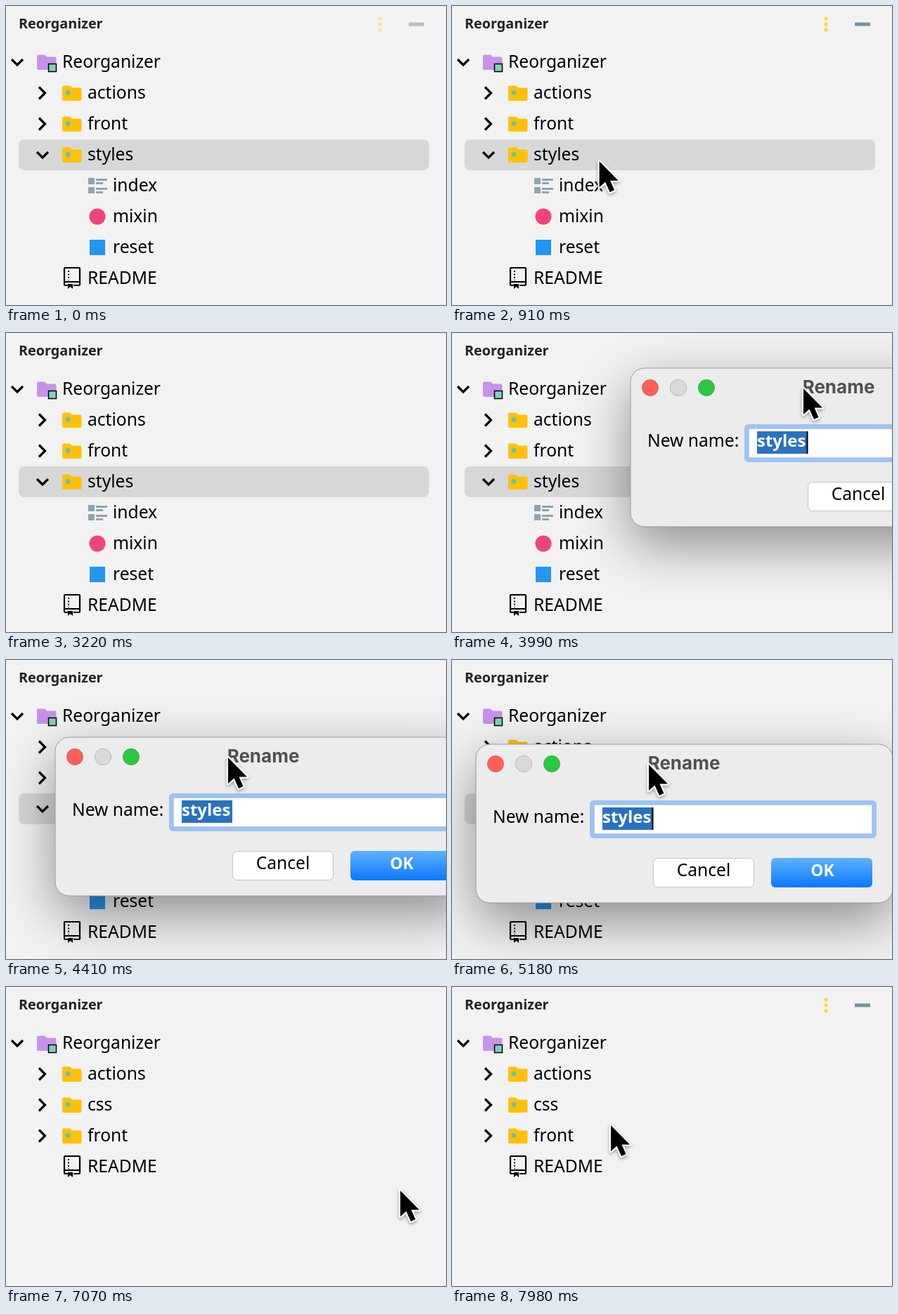
An HTML page that plays this animation: 626x426 px, repeating every 8 s.

```html
<!DOCTYPE html>
<html lang="en">
<head>
<meta charset="utf-8">
<title>Renaming a group</title>
<style>
  html, body { margin: 0; width: 100%; height: 100%; overflow: hidden; background: #f2f2f2; }
  svg { display: block; width: 626px; height: 426px; }
  text { font: 500 24.6px "Noto Sans", "Open Sans", sans-serif; fill: #000; white-space: pre; }
  .head { font-size: 19.8px; font-weight: 700; fill: #222; }
  .title { font: 700 26px Inter, "Liberation Sans", sans-serif; fill: #505050; text-anchor: middle; }
  .mid { text-anchor: middle; }
  .menu text { font-size: 24px; }
  .white { fill: #fff; }
  .ok { fill: #fff; font-size: 23px; font-weight: 600; }
  .selected { fill: #fff; font-size: 24px; font-weight: 600; }
  .chev { fill: none; stroke: #000; stroke-width: 3.2; }
  #dialogBox { filter: drop-shadow(0 26px 38px rgba(0, 0, 0, .42)); }
  #menuShadow { filter: drop-shadow(0 10px 12px rgba(0, 0, 0, .38)); }
  #cursor path { filter: drop-shadow(0 2px 2px rgba(0, 0, 0, .35)); }
</style>
</head>
<body>
<svg viewBox="0 0 626 426">
  <defs>
    <linearGradient id="blue" x2="0" y2="1">
      <stop offset="0" stop-color="#5fb1fb"/><stop offset="1" stop-color="#0a78ff"/>
    </linearGradient>
    <path id="down" class="chev" d="M-8-4L0 4 8-4"/>
    <path id="right" class="chev" d="M-5-8.500L3.500 0-5 8.500"/>
    <path id="folder" d="M-12-10.500h9l3 3h11.500a2 2 0 0 1 2 2v14.500a2 2 0 0 1-2 2h-23.500a2 2 0 0 1-2-2v-17.500a2 2 0 0 1 2-2z"/>
    <g id="root">
      <use href="#folder" fill="#c792ea"/>
      <rect x="2.500" y="2.500" width="11" height="11" fill="#7fd0bd" stroke="#000" stroke-width="1.500"/>
    </g>
    <g id="group">
      <use href="#folder" fill="#ffc107"/>
      <circle cx="-6" cy="-.5" r="3.500" fill="#66c2ae"/>
    </g>
    <path id="list" fill="#90a4ae" d="M-13-11h9v9h-9zM-13 2h9v9h-9zM-2-10h16v3h-16zM-2-5h10v3h-10zM-2 3h16v3h-16zM-2 8h10v3h-10z"/>
    <circle id="pink" r="11.500" fill="#f0437a"/>
    <rect id="square" x="-11" y="-11" width="22" height="22" fill="#2196f3"/>
    <g id="book" fill="none" stroke="#000" stroke-width="2.200">
      <path d="M-6 10h-4a1 1 0 0 1-1-1v-23a1 1 0 0 1 1-1h20a1 1 0 0 1 1 1v23a1 1 0 0 1-1 1h-8M-11 5h22"/>
      <path d="M-5-11v14" stroke-dasharray="2 2.400" stroke-width="2"/>
      <path d="M-6 8h7v7l-3.500-3-3.500 3z" fill="#000" stroke="none"/>
    </g>
  </defs>

  <rect width="626" height="426" fill="#f2f2f2"/>
  <text class="head" x="18" y="32">Reorganizer</text>
  <g id="tools">
    <g fill="#ffd740">
      <circle cx="532" cy="18" r="2.700"/><circle cx="532" cy="26" r="2.700"/><circle cx="532" cy="34" r="2.700"/>
    </g>
    <rect x="573" y="23.500" width="22" height="5" fill="#78909c"/>
  </g>
  <g id="before"><rect x="18" y="190" width="584" height="44" rx="8" fill="#d7d7d7"/></g>
  <g id="after"></g>

  <g id="menu" class="menu">
    <rect id="menuShadow" x="207.500" y="203.500" width="203" height="187" rx="16" fill="#f0f0f0"/>
    <rect x="207.500" y="203.500" width="203" height="187" rx="16" fill="#f0f0f0" stroke="#5a5a5a"/>
    <rect id="hover" x="218" width="182" height="44" rx="8" fill="#2a74c2"/>
    <text id="add" x="238" y="246">Add Group</text>
    <text id="rename" x="238" y="294">Rename</text>
    <path d="M231 321h157" stroke="#d8d8d8" stroke-width="2"/>
    <text x="238" y="360">Unshelve</text>
  </g>

  <g id="dialog">
    <rect id="dialogBox" width="593" height="226" rx="20" fill="#ececec"/>
    <rect width="593" height="226" rx="20" fill="#ececec" stroke="#9a9a9a"/>
    <g stroke-opacity=".18" stroke="#000">
      <circle cx="28" cy="28" r="11.700" fill="#ff5f57"/>
      <circle cx="68" cy="28" r="11.700" fill="#d9d9d9"/>
      <circle cx="108" cy="28" r="11.700" fill="#28c840"/>
    </g>
    <text class="title" x="296" y="36">Rename</text>
    <text x="24" y="112">New name:</text>
    <rect x="162" y="80" width="408" height="54" rx="6" fill="#9bc3f5"/>
    <rect x="168.500" y="86.500" width="395" height="41" fill="#fff" stroke="#c4cad2"/>
    <rect id="mark" x="180" y="90" width="72" height="32" fill="#2a72c0"/>
    <text id="field" x="180" y="112"></text>
    <rect id="caret" y="90" width="2" height="32"/>
    <rect x="252.500" y="162.500" width="143" height="41" rx="6" fill="#fff" stroke="#c2c2c2"/>
    <text class="mid" x="324" y="188">Cancel</text>
    <rect x="420" y="162" width="144" height="42" rx="6" fill="url(#blue)"/>
    <rect id="press" x="420" y="162" width="144" height="42" rx="6" fill="#003a9a" opacity=".3"/>
    <text class="mid ok" x="493" y="188">OK</text>
  </g>

  <g id="cursor">
    <path d="M1 2V39L9.500 31.500 16 46 22.500 43 16.500 29.500H28Z" stroke="#fff" stroke-width="4.500" stroke-linejoin="round" paint-order="stroke"/>
  </g>
</svg>
<script>
const LOOP = 8000, STEP = 70, FIRST_ROW = 80, ROW = 44, INDENT = 36;
const el = Object.fromEntries([...document.querySelectorAll('[id]')].map(e => [e.id, e]));

// Tree rows: depth, arrow, icon, label
const head = [[0, 'down', 'root', 'Reorganizer'], [1, 'right', 'group', 'actions']];
const readme = [1, '', 'book', 'README'];
const rowsBefore = [
  ...head,
  [1, 'right', 'group', 'front'],
  [1, 'down', 'group', 'styles'],
  [2, '', 'list', 'index'],
  [2, '', 'pink', 'mixin'],
  [2, '', 'square', 'reset'],
  readme
];
const rowsAfter = [...head, [1, 'right', 'group', 'css'], [1, 'right', 'group', 'front'], readme];

const use = (id, x, y) => id ? `<use href="#${id}" x="${x}" y="${y}"/>` : '';
const drawRow = ([depth, arrow, icon, label], i) => {
  const x = depth * INDENT, y = FIRST_ROW + i * ROW;
  return use(arrow, x + 16, y) + use(icon, x + 58, y) +
    `<text x="${x + 80}" y="${y + 8}">${label}</text>`;
};
el.before.innerHTML += rowsBefore.map(drawRow).join('');
el.after.innerHTML = rowsAfter.map(drawRow).join('');

const linear = p => p;
const smooth = p => p * p * (3 - 2 * p);

// Keys are [time, ...values]; values hold before the first and after the last.
function track(keys, t, ease = linear) {
  const i = keys.findIndex(k => k[0] > t);
  if (i === 0) return keys[0].slice(1);
  if (i < 0) return keys.at(-1).slice(1);
  const a = keys[i - 1], b = keys[i];
  const p = ease((t - a[0]) / (b[0] - a[0]));
  return a.slice(1).map((v, n) => v + (b[n + 1] - v) * p);
}

const toolsFade = [[0, .5], [280, 1], [1820, 1], [2240, 0], [7070, 0], [7490, 1]];
const shadowFade = [[1120, .25], [1330, .6], [1400, .6], [1610, 1]];
const menuFade = [[2310, 1], [2660, 0]];
const drag = [[3640, 570, -44], [3710, 500, -24], [3990, 254, 50], [4200, 152, 88], [4410, 70, 110], [4620, 34, 120]];
const approach = [[350, 226, 426], [980, 208, 212], [1820, 208, 212], [2240, 268, 284]];
const leave = [[6230, 281, 147], [6510, 538, 249], [6720, 560, 288], [7630, 560, 288], [7980, 225, 195]];
const typed = [[0, 'styles'], [5810, 'c'], [6020, 'cs'], [6230, 'css']];

const show = (e, on) => e.setAttribute('visibility', on ? 'visible' : 'hidden');
const move = (e, [x, y]) => e.setAttribute('transform', `translate(${x} ${y})`);
const within = (t, a, b) => t >= a && t < b;
const display = (e, on) => { e.style.display = on ? '' : 'none'; };

function cursorAt(t, box) {
  if (within(t, 420, 3150)) return track(approach, t, smooth);
  if (within(t, 3710, 5810)) return [box[0] + 245, box[1] + 27];
  if (t >= 6230) return track(leave, t, t > 7500 ? smooth : linear);
  return null;
}

function drawMenu(t, pos) {
  display(el.menu, within(t, 1120, 2660));
  el.menu.style.opacity = track(menuFade, t)[0];
  el.menuShadow.style.opacity = track(shadowFade, t)[0];
  const y = pos ? pos[1] : 0;
  const onAdd = t >= 1890 && within(y, 218, 262), onRename = t >= 1890 && y >= 262;
  display(el.hover, onAdd || onRename);
  el.hover.setAttribute('y', onAdd ? 216 : 264);
  el.add.setAttribute('class', onAdd ? 'white' : '');
  el.rename.setAttribute('class', onRename ? 'white' : '');
}

function drawDialog(t, box) {
  display(el.dialog, within(t, 3710, 7070));
  move(el.dialog, box);
  const selected = t < 5810;
  const word = typed.findLast(k => k[0] <= t)[1];
  if (el.field.textContent !== word) el.field.textContent = word;
  el.field.setAttribute('class', selected ? 'selected' : '');
  show(el.mark, selected);
  const since = t - (selected ? 3710 : 6230);
  show(el.caret, since < 0 || Math.floor(since / 500) % 2 === 0);
  const width = el.dialog.style.display ? 0 : el.field.getComputedTextLength();
  el.caret.setAttribute('x', selected ? 250.5 : 180 + width);
  show(el.press, within(t, 6790, 7000));
}

function frame(now) {
  const t = Math.floor(now % LOOP / STEP) * STEP;
  const box = track(drag, t), pos = cursorAt(t, box);
  el.tools.style.opacity = track(toolsFade, t)[0];
  display(el.before, t < 7070);
  display(el.after, t >= 7070);
  drawMenu(t, pos);
  drawDialog(t, box);
  display(el.cursor, pos);
  if (pos) move(el.cursor, pos);
}

const start = performance.now();
function tick() {
  frame(performance.now() - start);
  requestAnimationFrame(tick);
}
tick();
</script>
</body>
</html>
```
